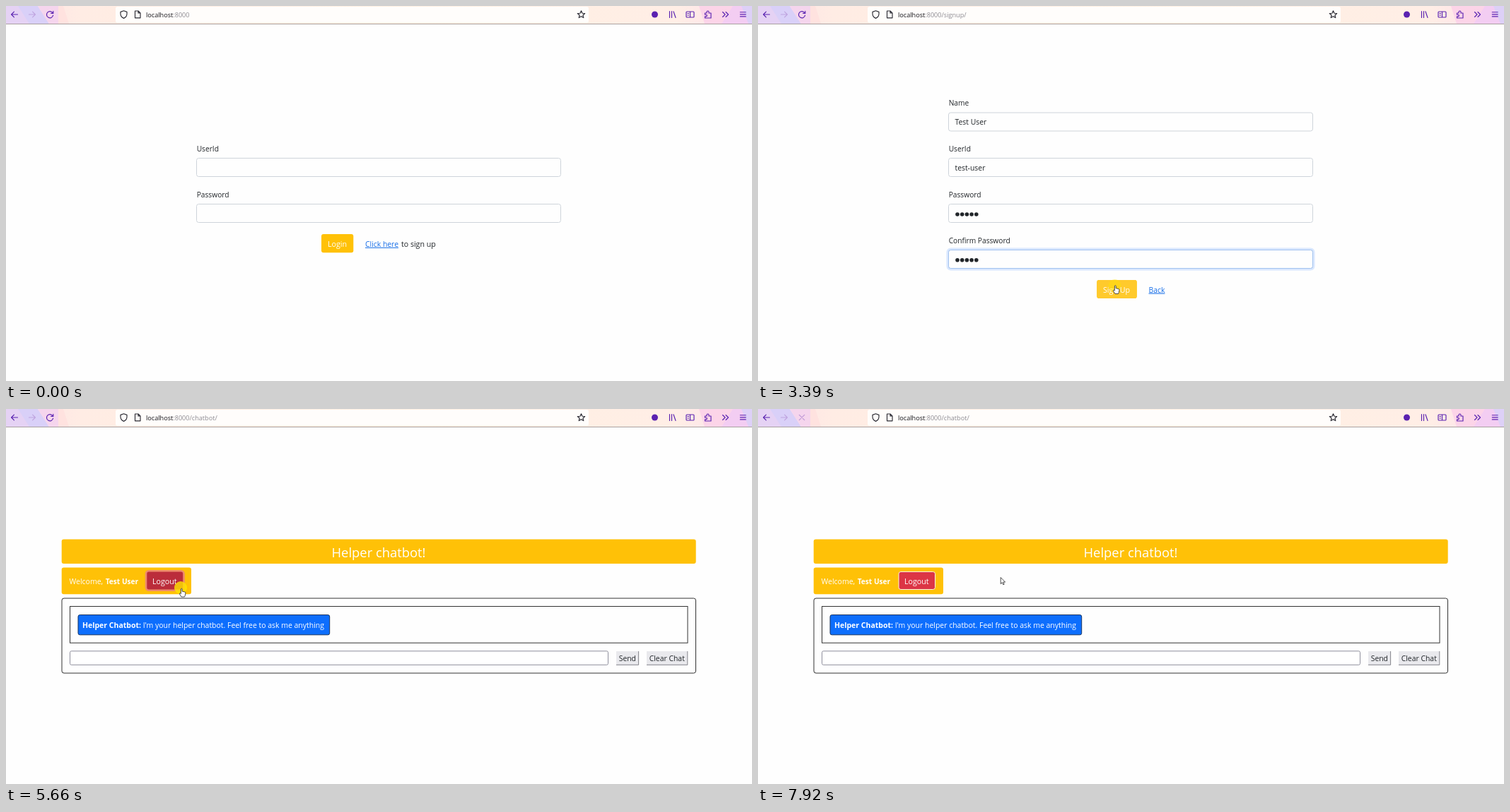
These frames come from a looping animation (1055x531 px, 8 s). An HTML page:

```html
<!DOCTYPE html>
<html lang="en">
<head>
<meta charset="utf-8">
<title>Chatbot sign-up</title>
<style>
html, body { margin: 0; width: 100%; height: 100%; overflow: hidden; background: #fefefe; }
svg { display: block; width: 100vw; height: 100vh; font: 10.4px "Open Sans", "Noto Sans", sans-serif; }
text { fill: #212529; white-space: pre; }
[data-on] { visibility: hidden; }
[data-on].on { visibility: visible; }
.label { font-size: 10.2px; }
.url { font-size: 9.15px; fill: #15141a; }
.url .path { fill: #8d8b92; }
.field { fill: #fefefe; stroke: #ced4da; }
.ring { fill: none; stroke: #0d6efd; stroke-opacity: .25; stroke-width: 3; }
.focus { fill: none; stroke: #86b7fe; }
.amber { fill: #ffc107; }
.light { fill: #fff; font-size: 10.7px; }
.link { fill: #1a70e8; text-decoration: underline; }
.hover { fill: #0a58ca; }
.bold { font-weight: 700; }
.icon { fill: none; stroke: #5a22b0; stroke-width: 1.15; stroke-linecap: round; stroke-linejoin: round; }
.ink { stroke: #2b2a33; }
.frame { fill: none; stroke: #333; }
.cursor { fill: #fff; stroke: #222; stroke-width: .8; stroke-linejoin: round; }
</style>
</head>
<body>
<svg viewBox="0 0 1055 531" preserveAspectRatio="none">
  <defs>
    <linearGradient id="theme">
      <stop offset="0" stop-color="#fde0e4"/>
      <stop offset=".1" stop-color="#ffece4"/>
      <stop offset=".5" stop-color="#fff0e0"/>
      <stop offset=".9" stop-color="#ffeee6"/>
      <stop offset="1" stop-color="#fcdcec"/>
    </linearGradient>
    <g id="box"><rect class="field" x="269.5" width="515" height="26" rx="3"/></g>
    <g id="glow">
      <rect class="ring" x="268" y="-1.5" width="518" height="29" rx="4.5"/>
      <rect class="focus" x="269.5" width="515" height="26" rx="3"/>
    </g>
    <g id="dots" fill="#212529">
      <circle cx="282" r="2.8"/><circle cx="288.7" r="2.8"/><circle cx="295.4" r="2.8"/>
      <circle cx="302.1" r="2.8"/><circle cx="308.8" r="2.8"/>
    </g>
    <path id="arrow" class="cursor" d="M0 .5V9.6L2.1 7.7L3.6 10.8L5 10.2L3.6 7.1H6.4Z"/>
    <path id="hand" class="cursor" d="M-.9 .8Q0 -.4 .9 .8V4.2L4.6 5Q5.8 5.3 5.6 6.8L5 10.2L4.2 12H-.4L-2.8 8Q-3.2 6.7 -2 6.7L-.9 7.6Z"/>
    <path id="beam" fill="none" stroke="#555" d="M-2 -4.5H-.6L0 -4L.6 -4.5H2M0 -4V4M-2 4.5H-.6L0 4L.6 4.5H2"/>
    <circle id="click" r="9" fill="#ffe600" fill-opacity=".8"/>
    <path id="cross" d="M58.3 8.3L65.7 15.7M65.7 8.3L58.3 15.7"/>
  </defs>

  <!-- Browser bar -->
  <rect width="1055" height="25" fill="url(#theme)"/>
  <path fill="#d9d0f8" d="M0 0H45L61 25H0Z"/>
  <path fill="#e5d2f4" d="M0 0H17L33 25H0Z"/>
  <path fill="#f5d5ed" d="M45 0H74V25H61Z"/>
  <path fill="#ffe2df" d="M74 0H81L89 25H74Z"/>
  <path fill="#fcd4e8" d="M980 0H1055V25H988Z"/>
  <path fill="#f3cdf2" d="M1012 25L1028 0H1055V25Z"/>
  <path fill="#ddd0f7" d="M1040 0H1055V25H1050Z"/>
  <rect x="155" y="1" width="669" height="22.5" rx="2.5" fill="#fffdfb"/>
  <path stroke="#aaa1a0" d="M0 25.5H1055"/>

  <g class="icon">
    <path d="M16.5 12H7.6M11.4 8.2L7.6 12L11.4 15.8"/>
    <path stroke="#bfa4df" d="M32.5 12H41.4M37.6 8.2L41.4 12L37.6 15.8"/>
    <path data-on="0-11" d="M66 9.8A4.6 4.6 0 1 0 66.6 13.2M66.8 7.4V10.4H63.7"/>
    <use data-on="12" href="#cross" opacity=".7"/>
    <use data-on="13" href="#cross"/>
    <use data-on="14" href="#cross" opacity=".35"/>
    <circle cx="917.5" cy="12" r="4.5" fill="#5a22b0" stroke="none"/>
    <path d="M938.5 7.5V16.5M941.5 7.5V16.5M944 7.8L947 16.5"/>
    <path d="M963 8H972Q973 8 973 9V15Q973 16 972 16H963Q962 16 962 15V9Q962 8 963 8ZM967.5 8V16M964 10.5H965.5M964 13H965.5"/>
    <path d="M988.5 10H991V8.6Q991 7 992.5 7T994 8.6V10H997V17H988.5V14.8H990Q991.4 14.8 991.4 13.5T990 12.2H988.5Z"/>
    <path d="M1013.5 8.5L1017 12L1013.5 15.5M1018 8.5L1021.5 12L1018 15.5"/>
    <path d="M1038.3 8.7H1046.2M1038.3 11.8H1046.2M1038.3 14.9H1046.2"/>
  </g>
  <g class="icon ink">
    <path d="M166.5 6.8L171 8.4V11Q171 15.5 166.5 17.4Q162 15.5 162 11V8.4Z"/>
    <path d="M182.5 7H187L190 10V16.8H182.5ZM187 7V10H190"/>
    <path d="M813.5 6.8L815 10.2L818.7 10.5L815.9 13L816.8 16.6L813.5 14.7L810.2 16.6L811.1 13L808.3 10.5L812 10.2Z"/>
  </g>
  <text class="url" x="198" y="15.7">localhost<tspan class="path">:8000</tspan></text>
  <text class="url" x="259.5" y="15.7" data-on="3-7"><tspan class="path">/signup/</tspan></text>
  <text class="url" x="259.5" y="15.7" data-on="8-10 14"><tspan class="path">/chatbot/</tspan></text>

  <!-- Fields shared by login and sign-up -->
  <g data-on="0-7 11-13">
    <text class="label" x="269.7" y="206">UserId</text>
    <use href="#box" y="215.5"/>
    <text class="label" x="269.7" y="271">Password</text>
    <use href="#box" y="280.5"/>
  </g>
  <g data-on="4-7 12-13">
    <text x="278.5" y="233.3">test-user</text>
    <use href="#dots" y="295"/>
  </g>
  <use data-on="12-13" href="#glow" y="280.5"/>

  <!-- Login -->
  <g data-on="0-2 11-13">
    <rect class="amber" x="446" y="323" width="45.3" height="26.3" rx="3"/>
    <text class="light" x="455" y="340.8">Login</text>
    <text class="link" x="508" y="340.8">Click here</text>
    <text x="559" y="340.8" font-size="10.6">to sign up</text>
  </g>
  <text class="link hover" x="508" y="340.8" data-on="1-2">Click here</text>

  <!-- Sign-up -->
  <g data-on="3-7">
    <text class="label" x="269.7" y="141">Name</text>
    <use href="#box" y="151"/>
    <text x="278.5" y="168.3">Test User</text>
    <text class="label" x="269.7" y="335.7">Confirm Password</text>
    <use href="#box" y="345.5"/>
    <rect class="amber" x="479.3" y="388" width="56.4" height="26" rx="3"/>
    <text class="link" x="552.5" y="405.6">Back</text>
  </g>
  <use data-on="3" href="#glow" y="151"/>
  <use data-on="4-7" href="#dots" y="359.7"/>
  <use data-on="4-5" href="#glow" y="345.5"/>
  <use data-on="6" href="#glow" y="345.5" opacity=".6"/>
  <path data-on="5" stroke="#212529" d="M312.5 352V366"/>
  <rect data-on="5-7" x="479.3" y="388" width="56.4" height="26" rx="3" fill="#ffca2c"/>
  <rect data-on="7" x="478.5" y="387" width="58" height="28" rx="3.5" fill="#ffcd39" stroke="#e8cf8c" stroke-width="2.6"/>
  <text class="light" x="488" y="405.6" data-on="3-7">Sign Up</text>

  <!-- Chat -->
  <g data-on="8-10 14">
    <rect class="amber" x="78.7" y="184.5" width="897" height="34.5" rx="3"/>
    <text class="light" x="527" y="209.5" text-anchor="middle" style="font-size:18.4px">Helper chatbot!</text>
    <rect class="amber" x="78.7" y="224.5" width="183.3" height="37.8" rx="3"/>
    <text class="light" x="89.5" y="247.7" style="font-size:10.5px">Welcome,</text>
    <text class="light bold" x="140.7" y="247.7" style="font-size:10.15px">Test User</text>
    <rect x="199" y="230.5" width="51.5" height="25" rx="3" fill="#dc3545" stroke="#f8f0e4"/>
    <rect class="frame" x="79" y="268" width="896.5" height="106" rx="3"/>
    <rect class="frame" x="90.5" y="279.5" width="873.5" height="51.7"/>
    <rect x="102" y="291.5" width="355.7" height="28.3" rx="2.5" fill="#0d6efd" stroke="#16335f"/>
    <text class="light bold" x="108" y="310" style="font-size:10.5px">Helper Chatbot:</text>
    <text class="light" x="193.7" y="310" style="font-size:10.46px">I'm your helper chatbot. Feel free to ask me anything</text>
    <rect x="90.5" y="342.8" width="761" height="19.5" rx="2" fill="#fff" stroke="#8f8f9d"/>
    <path fill="#e9e9ed" d="M863 343H895V362.5H863ZM906 343H964V362.5H906Z"/>
    <path fill="none" stroke="#85858c" d="M863 362.3H894.6V343M906 362.3H963.8V343"/>
    <text x="866.7" y="357">Send</text>
    <text x="909.7" y="357">Clear Chat</text>
  </g>
  <rect data-on="10" x="198" y="229.3" width="53.5" height="27.4" rx="4" fill="#bb2d3b" stroke="#ee8b6c" stroke-width="2.6"/>
  <text class="light" x="207" y="247.7" data-on="8-10 14">Logout</text>

  <!-- Status bar -->
  <g data-on="1-2 12-13">
    <path fill="#f9f9fb" stroke="#cfcfd4" d="M-1 518.5H176Q178.5 518.5 178.5 521V532H-1Z"/>
    <text x="0" y="529" font-size="8">ocalhost<tspan data-on="1-2">:8000/signup/</tspan></text>
  </g>

  <!-- Pointer -->
  <use data-on="2" href="#click" x="535" y="338"/>
  <use data-on="1-2" href="#hand" x="536" y="338"/>
  <use data-on="3" href="#beam" x="535" y="166"/>
  <use data-on="4" href="#beam" x="501" y="360"/>
  <use data-on="6" href="#click" x="504.5" y="396" opacity=".5"/>
  <use data-on="7" href="#click" x="504.5" y="396"/>
  <use data-on="5-7" href="#hand" x="505.3" y="395.5"/>
  <use data-on="8" href="#arrow" x="505" y="394.3"/>
  <use data-on="10" href="#click" x="247" y="253"/>
  <use data-on="9-10" href="#hand" x="248.3" y="254"/>
  <use data-on="11" href="#arrow" x="248.7" y="253.5"/>
  <use data-on="12" href="#beam" x="343.5" y="238"/>
  <use data-on="13-14" href="#arrow" x="343.2" y="238"/>
</svg>
<script>
const LOOP = 8000;
const starts = [0, 570, 1140, 1700, 2270, 2830, 3390, 3970, 4530, 5100, 5660, 6220, 6780, 7350, 7920];

// data-on lists the steps, singly or as ranges, in which a part is visible
const parts = [...document.querySelectorAll('[data-on]')].map(el => ({
  el,
  spans: el.dataset.on.split(' ').map(s => s.split('-').map(Number))
}));

let shown = -1;

function draw() {
  const t = performance.now() % LOOP;
  const step = starts.findLastIndex(s => s <= t);
  if (step !== shown) {
    shown = step;
    for (const { el, spans } of parts) {
      el.classList.toggle('on', spans.some(([a, b = a]) => step >= a && step <= b));
    }
  }
  requestAnimationFrame(draw);
}
draw();
</script>
</body>
</html>
```
